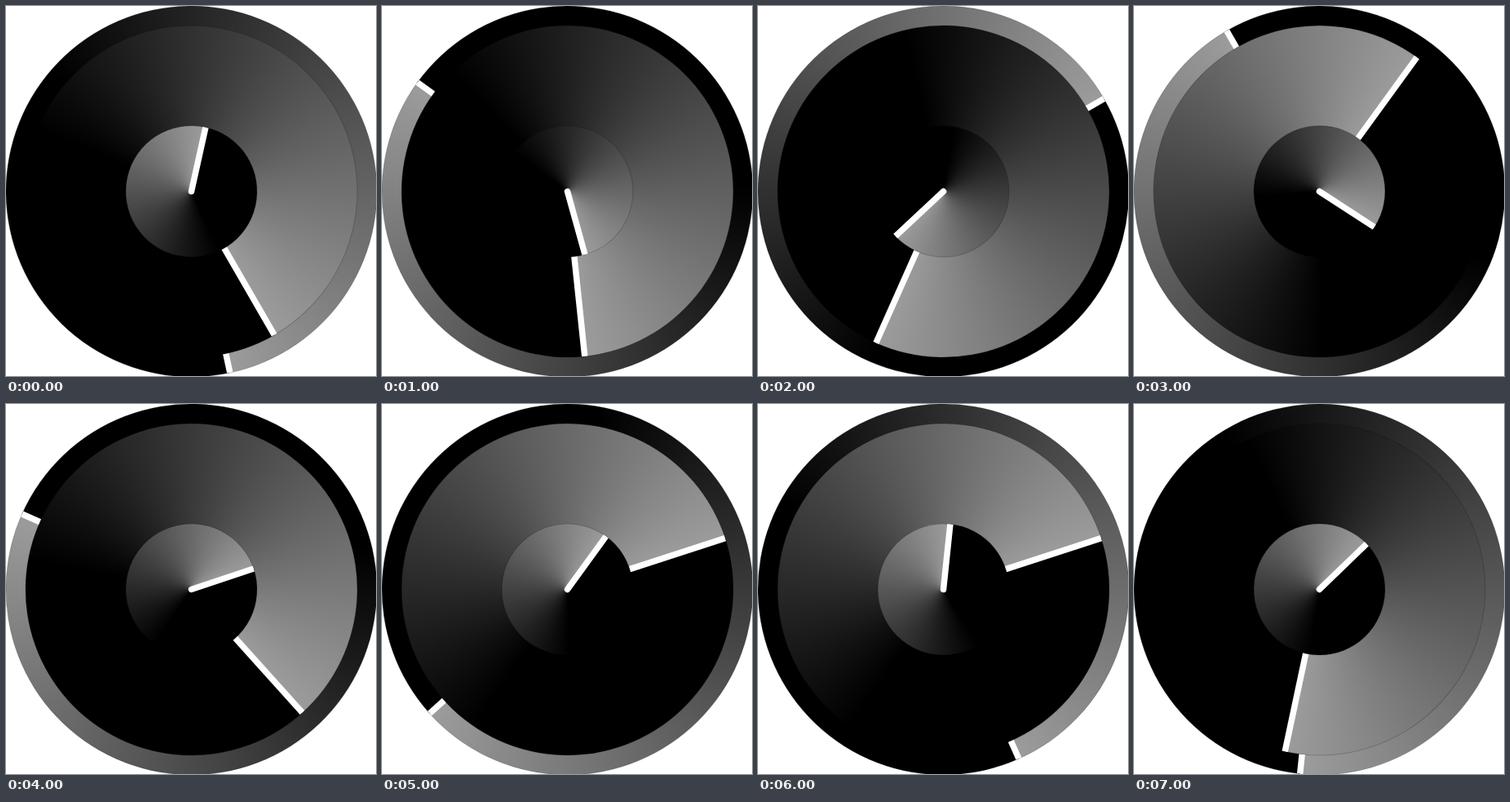
An HTML page with a canvas for the animation above (8 s loop, 454 by 454 pixels).

```html
<!DOCTYPE html>
<html lang="en">
<head>
<meta charset="utf-8">
<title>Gradient clock</title>
<style>
  html, body { margin: 0; width: 100%; height: 100%; overflow: hidden; background: #fff; }
  canvas { display: block; }
</style>
</head>
<body>
<canvas id="clock" width="454" height="454"></canvas>
<script>
const ctx = document.getElementById('clock').getContext('2d');
const CENTER = 227.5;
const STEP = 1000;
const HAND = 7.5;
const TRAIL = 218; // degrees over which the grey behind a hand fades out

// one unrelated time of day per step
const TIMES = '0:25:28 5:29:51 7:34:10 4:06:55 2:23:49 1:12:38 0:12:26 1:32:31'.split(' ');

function disc(radius, turn, inner) {
  ctx.save();
  ctx.translate(CENTER, CENTER);
  ctx.rotate((turn - 1 / 4) * 2 * Math.PI);

  const fill = ctx.createConicGradient(0, 0, 0);
  fill.addColorStop(1 - TRAIL / 360, '#000');
  fill.addColorStop(1, '#9c9c9c');
  ctx.beginPath();
  ctx.arc(0, 0, radius, 0, 2 * Math.PI);
  ctx.fillStyle = fill;
  ctx.fill();
  ctx.lineWidth = 1;
  ctx.strokeStyle = 'rgba(0,0,0,.2)';
  ctx.stroke();
  ctx.clip();

  ctx.beginPath();
  ctx.moveTo(inner, 0);
  ctx.lineTo(radius, 0);
  ctx.lineWidth = HAND;
  ctx.lineCap = inner ? 'butt' : 'round';
  ctx.strokeStyle = '#fff';
  ctx.stroke();
  ctx.restore();
}

function draw(time) {
  const [h, m, s] = time.split(':').map(Number);
  ctx.clearRect(0, 0, 454, 454);
  disc(227.5, s / 60, 190);
  disc(203.5, m / 60, 70);
  disc(80.5, (h + m / 60) / 12, 0);
}

const start = performance.now();
let shown = -1;

function tick() {
  const step = Math.floor((performance.now() - start) / STEP) % TIMES.length;
  if (step !== shown) draw(TIMES[shown = step]);
  requestAnimationFrame(tick);
}
tick();
</script>
</body>
</html>
```
